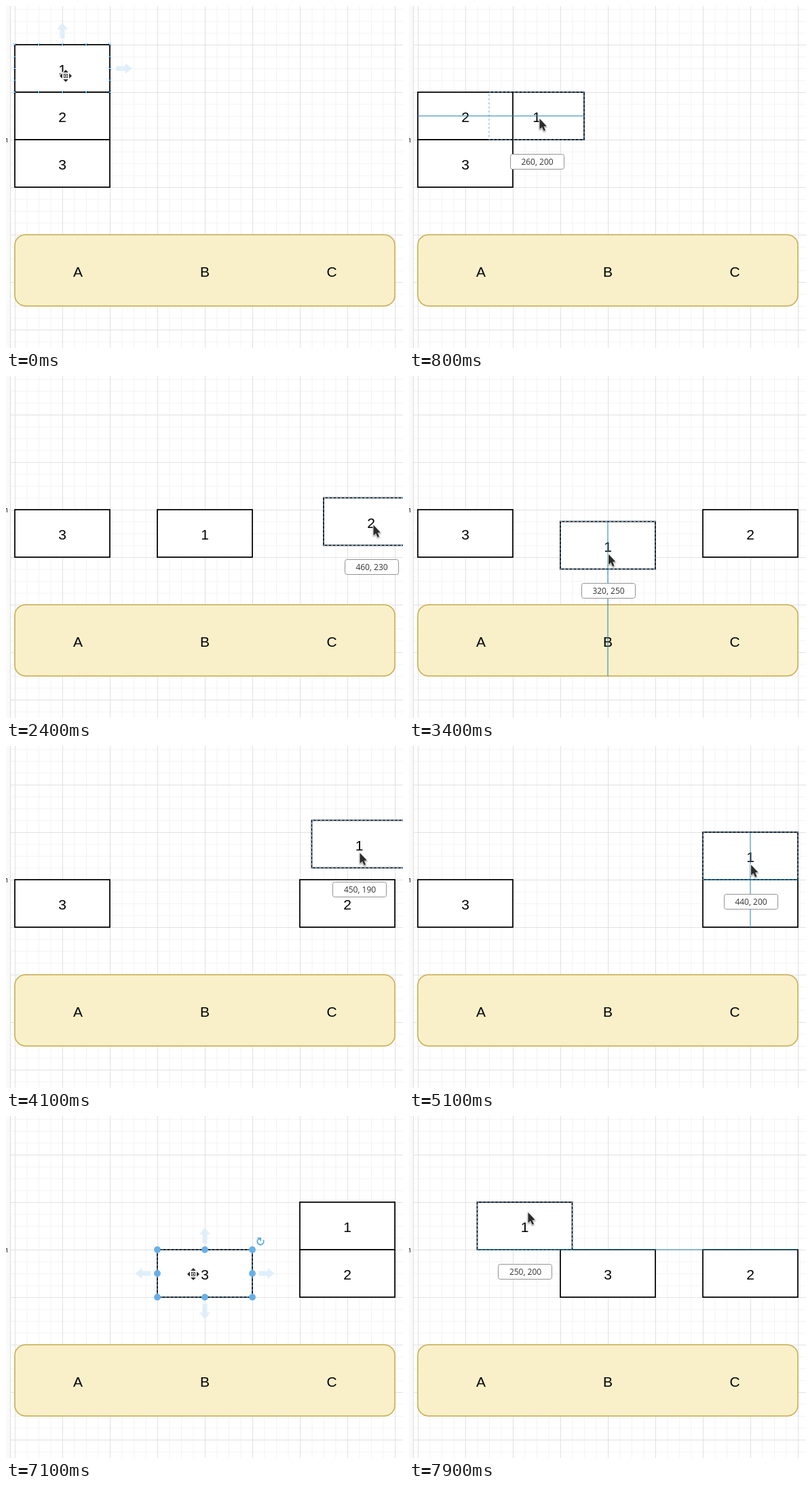
An HTML page with a canvas for the animation above (8000 ms loop, 585 by 504 pixels).

```html
<!DOCTYPE html>
<html lang="en">
<head>
<meta charset="utf-8">
<title>Stacking blocks on a diagram canvas</title>
<style>
  html, body { margin: 0; width: 100%; height: 100%; overflow: hidden; background: #fff; }
  canvas { display: block; }
</style>
</head>
<body>
<canvas id="stage" width="585" height="504"></canvas>
<script>
const ctx = document.getElementById('stage').getContext('2d');
const LOOP = 8000, TICK = 100, BOX_W = 140, BOX_H = 70;
const LABEL_FONT = '21px "Liberation Sans", Arial, sans-serif';
const TIP_FONT = '12px "Open Sans", "Noto Sans", sans-serif';
const tray = { x: 13, y: 337, w: 560, h: 105 };

// Diagram units to pixels
const toX = u => 13 + (u - 200) * 1.75;
const toY = v => 127 + (v - 200) * 1.75;
const snap = n => Math.round(n / 10) * 10;

// Path points: [time, x, y] in diagram units; grip: pointer offset in the box
const drags = [
  { box: 1, start: 500, drop: 1500, grip: [74, 39],
    path: [[400, 200, 160], [700, 240, 180], [1100, 320, 240]] },
  { box: 2, start: 1800, drop: 2800, grip: [73, 40],
    path: [[1700, 200, 200], [2000, 300, 150], [2400, 460, 230], [2600, 440, 240]] },
  { box: 1, start: 3400, drop: 5400, grip: [70.5, 48],
    path: [[3300, 320, 240], [3500, 310, 250], [3700, 350, 180], [3900, 430, 160],
           [4100, 450, 190], [4200, 450, 200], [4400, 430, 200], [4900, 430, 200], [5000, 440, 200]] },
  { box: 3, start: 5700, drop: 7000, grip: [26.5, 14],
    path: [[5600, 200, 240], [5900, 260, 170], [6100, 310, 180], [6500, 320, 230], [6600, 320, 240]] },
  { box: 1, start: 7500, drop: LOOP, grip: [74.5, 15],
    path: [[7400, 440, 200], [7600, 360, 160], [7900, 250, 200]] }
];

const hovers = [
  { box: 1, from: 0, to: 500, arrows: true },
  { box: 2, from: 1600, to: 1800, arrows: false },
  { box: 1, from: 3100, to: 3400, arrows: true },
  { box: 3, from: 5500, to: 5700, arrows: false },
  { box: 1, from: 7300, to: 7500, arrows: true }
];

// Pointer between drags: [time, x, y, shape]
const pointerKeys = [
  [0, 88, 103, moveCursor], [200, 87, 96, arrowCursor],
  [1500, 237, 182, arrowCursor], [1600, 86, 166, moveCursor],
  [2800, 506, 237, moveCursor], [2900, 450, 238, moveCursor], [3000, 390, 241, arrowCursor],
  [3100, 300, 244, moveCursor], [3200, 293, 245, moveCursor],
  [5400, 200, 258, arrowCursor], [5500, 45, 214, moveCursor],
  [7000, 276, 233, moveCursor], [7200, 420, 180, arrowCursor], [7300, 507, 142, moveCursor]
];

function along(path, t) {
  const next = path.findIndex(p => p[0] > t);
  if (next < 0) return path[path.length - 1].slice(1);
  if (next === 0) return path[0].slice(1);
  const [a, b] = [path[next - 1], path[next]];
  const k = (t - a[0]) / (b[0] - a[0]);
  return [1, 2].map(i => snap(a[i] + (b[i] - a[i]) * k));
}

function line(x1, y1, x2, y2) {
  ctx.beginPath();
  ctx.moveTo(x1, y1);
  ctx.lineTo(x2, y2);
  ctx.stroke();
}

function polygon(points) {
  ctx.beginPath();
  points.forEach(([x, y]) => ctx.lineTo(x, y));
  ctx.closePath();
}

function roundBox(x, y, w, h, r) {
  ctx.beginPath();
  ctx.roundRect(x, y, w, h, r);
  ctx.fill();
  ctx.stroke();
}

function text(str, x, y, font, color) {
  ctx.font = font;
  ctx.fillStyle = color;
  ctx.textAlign = 'center';
  ctx.fillText(str, x, y);
}

function drawBackground() {
  ctx.fillStyle = '#fff';
  ctx.fillRect(0, 0, 585, 504);
  for (const major of [false, true]) {
    ctx.fillStyle = major ? '#e1e1e1' : '#f3f3f3';
    for (let i = 0; i < 36; i++) {
      if ((i % 4 === 0) !== major) continue;
      ctx.fillRect(13 + i * 17.5, 0, 1, 504);
      ctx.fillRect(0, -13 + i * 17.5, 585, 1);
    }
  }
  ctx.fillStyle = '#fafafa';
  ctx.fillRect(0, 0, 6, 504);
  ctx.fillStyle = '#dcdcdc';
  ctx.fillRect(6, 0, 1, 504);
  ctx.fillStyle = '#333';
  ctx.fillRect(0, 195, 2, 1);
  ctx.fillRect(1, 195, 1, 6);

  ctx.fillStyle = '#f9f0ca';
  ctx.strokeStyle = '#cbb45e';
  ctx.lineWidth = 1.75;
  roundBox(tray.x, tray.y, tray.w, tray.h, 15.75);
  ['A', 'B', 'C'].forEach((s, i) => text(s, 106 + i * 187, 399, LABEL_FONT, '#000'));
}

function drawBox(box) {
  ctx.fillStyle = '#fff';
  ctx.strokeStyle = '#000';
  ctx.lineWidth = 1.75;
  ctx.fillRect(box.x, box.y, box.w, box.h);
  ctx.strokeRect(box.x, box.y, box.w, box.h);
  text(box.id, box.x + box.w / 2, box.y + 44, LABEL_FONT, '#000');
}

function drawDashes(box) {
  ctx.strokeStyle = '#6fa9dc';
  ctx.lineWidth = 1;
  ctx.setLineDash([3, 3]);
  ctx.strokeRect(box.x, box.y, box.w, box.h);
  ctx.setLineDash([]);
}

// First edge or centre shared by the dragged box and another shape
function findGuide(box, others, pos, size) {
  for (const other of others) {
    const stops = r => [r[pos], r[pos] + r[size]];
    const mid = r => r[pos] + r[size] / 2;
    if (mid(box) === mid(other)) return { at: mid(box), other };
    const at = stops(other).find(s => stops(box).includes(s));
    if (at !== undefined) return { at, other };
  }
}

function drawGuides(box, others) {
  ctx.strokeStyle = '#1f7fae';
  ctx.lineWidth = 1;
  const v = findGuide(box, others, 'x', 'w');
  if (v) line(v.at, Math.min(box.y, v.other.y), v.at, Math.max(box.y + box.h, v.other.y + v.other.h));
  const h = findGuide(box, others, 'y', 'h');
  if (h) line(Math.min(box.x, h.other.x), h.at, Math.max(box.x + box.w, h.other.x + h.other.w), h.at);
}

function drawTip(box, u, v) {
  const cx = box.x + box.w / 2, y = box.y + box.h + 21;
  ctx.fillStyle = '#fff';
  ctx.strokeStyle = '#929292';
  ctx.lineWidth = 1;
  roundBox(Math.floor(cx - 39) + 0.5, Math.floor(y) + 0.5, 79, 22, 3);
  text(`${u}, ${v}`, cx + 1, Math.floor(y) + 16, TIP_FONT, '#333');
}

// Pale direction arrows, left out where another box or the side panel is in the way
function drawArrows(box, boxes) {
  const cx = box.x + box.w / 2, cy = box.y + box.h / 2;
  [[0, -1], [1, 0], [0, 1], [-1, 0]].forEach(([dx, dy], i) => {
    const x = cx + dx * (box.w / 2 + 9.5), y = cy + dy * (box.h / 2 + 9.5);
    const blocked = boxes.some(b => b !== box && x > b.x && x < b.x + b.w && y > b.y && y < b.y + b.h);
    if (blocked || x < 10) return;
    ctx.save();
    ctx.translate(x, y);
    ctx.rotate(i * Math.PI / 2);
    polygon([[-3.5, 0], [-3.5, -13], [-8, -13], [0, -23], [8, -13], [3.5, -13], [3.5, 0]]);
    ctx.fillStyle = '#dfeff9';
    ctx.fill();
    ctx.restore();
  });
}

function drawHandles(box) {
  drawDashes(box);
  ctx.fillStyle = '#67b0e8';
  for (let i = 0; i < 3; i++) {
    for (let j = 0; j < 3; j++) {
      if (i === 1 && j === 1) continue;
      ctx.beginPath();
      ctx.arc(box.x + i * box.w / 2, box.y + j * box.h / 2, 4.9, 0, 7);
      ctx.fill();
    }
  }
  const x = box.x + box.w + 12, y = box.y - 12;
  ctx.strokeStyle = '#62ace0';
  ctx.lineWidth = 2;
  ctx.beginPath();
  ctx.arc(x, y, 4.7, -0.5, 4.2);
  ctx.stroke();
  polygon([[x - 5, y - 6], [x + 1, y - 6], [x + 1, y]]);
  ctx.fillStyle = '#62ace0';
  ctx.fill();
}

function drawAnchors(box) {
  ctx.strokeStyle = '#5a9fd0';
  ctx.lineWidth = 1;
  for (let i = 0; i <= 4; i++) {
    for (let j = 0; j <= 4; j++) {
      if (i % 4 && j % 4) continue;
      const x = box.x + i * box.w / 4, y = box.y + j * box.h / 4;
      line(x - 2, y - 2, x + 2, y + 2);
      line(x - 2, y + 2, x + 2, y - 2);
    }
  }
}

function outlined(points) {
  polygon(points);
  ctx.lineJoin = 'round';
  ctx.strokeStyle = '#fff';
  ctx.lineWidth = 2;
  ctx.stroke();
  ctx.fillStyle = '#2b2b2b';
  ctx.fill();
  ctx.lineJoin = 'miter';
}

function arrowCursor() {
  ctx.shadowColor = 'rgba(0,0,0,.35)';
  ctx.shadowBlur = 2;
  ctx.shadowOffsetY = 1;
  outlined([[0.5, 0], [0.5, 15.5], [4, 12.3], [6.6, 18], [9, 17], [6.4, 11.3], [10.8, 11]]);
  ctx.shadowColor = 'transparent';
}

function moveCursor() {
  polygon([[0, -10.5], [10.5, 0], [0, 10.5], [-10.5, 0]]);
  ctx.fillStyle = 'rgba(235,235,235,.9)';
  ctx.fill();
  for (let i = 0; i < 4; i++) {
    outlined([[0, -9], [3.8, -5], [-3.8, -5]]);
    ctx.rotate(Math.PI / 2);
  }
  ctx.strokeStyle = '#444';
  ctx.lineWidth = 1;
  ctx.strokeRect(-2.5, -2.5, 5, 5);
  ctx.fillRect(-1, -1, 2, 2);
}

function render(t) {
  const units = { 1: [200, 160], 2: [200, 200], 3: [200, 240] };
  const begun = drags.filter(d => t >= d.start);
  begun.forEach(d => { units[d.box] = along(d.path, t); });
  const boxes = [1, 2, 3].map(id => ({
    id, x: toX(units[id][0]), y: toY(units[id][1]), w: BOX_W, h: BOX_H
  }));

  const last = begun[begun.length - 1];
  const current = last && boxes[last.box - 1];
  const dragging = last && t < last.drop;
  const hover = hovers.find(h => t >= h.from && t < h.to);

  drawBackground();
  boxes.forEach(drawBox);

  if (dragging) {
    drawDashes(current);
    drawGuides(current, [...boxes.filter(b => b !== current), tray]);
    drawTip(current, ...units[last.box]);
  } else if (current) {
    drawHandles(current);
    if (!hover) drawArrows(current, boxes);
  }
  if (hover) {
    const target = boxes[hover.box - 1];
    drawAnchors(target);
    if (hover.arrows) drawArrows(target, boxes);
  }

  let [, x, y, cursor] = pointerKeys.filter(k => k[0] <= t).pop();
  if (dragging) {
    x = current.x + last.grip[0];
    y = current.y + last.grip[1];
    cursor = arrowCursor;
  }
  ctx.save();
  ctx.translate(x, y);
  cursor();
  ctx.restore();
}

function frame() {
  const t = performance.now() % LOOP;
  render(Math.floor(t / TICK) * TICK);
  requestAnimationFrame(frame);
}
frame();
</script>
</body>
</html>
```
